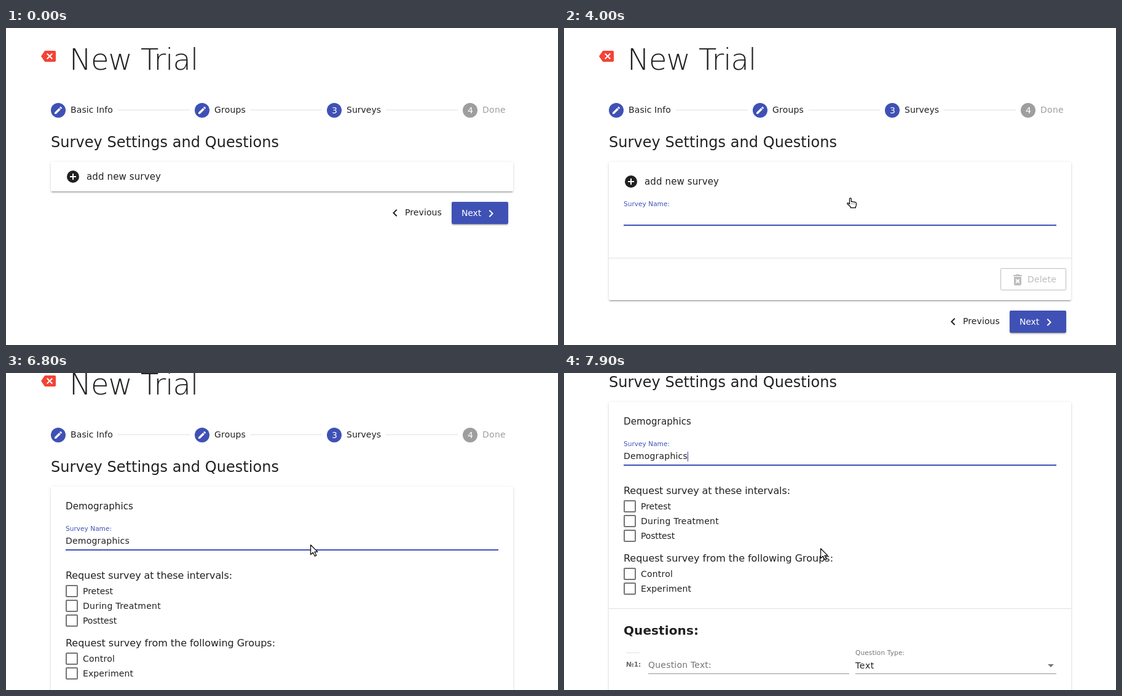
An HTML page that plays this animation: 898x516 px, repeating every 8000 ms.

```html
<!DOCTYPE html>
<html lang="en">
<head>
<meta charset="utf-8">
<title>New Trial</title>
<style>
@property --open { syntax: '<number>'; inherits: true; initial-value: 0; }
@property --float { syntax: '<number>'; inherits: true; initial-value: 0; }
@property --n { syntax: '<integer>'; inherits: true; initial-value: 0; }
@property --caret { syntax: '<integer>'; inherits: true; initial-value: 1; }
@property --scroll { syntax: '<number>'; inherits: true; initial-value: 0; }
@property --kind { syntax: '<integer>'; inherits: true; initial-value: 0; }

html, body { margin: 0; width: 100%; height: 100%; overflow: hidden; background: #fff; }
.stage {
  --ink: #212121; --blue: #3f51b5; --hint: #757575; --rule: #e0e0e0;
  position: absolute; inset: 0; overflow: hidden; background: #fff;
  color: var(--ink); font-family: "DejaVu Sans", sans-serif;
  animation-name: open, float, type, blink, scroll;
  animation-duration: 8s; animation-delay: -20ms;
  animation-timing-function: step-end; animation-iteration-count: infinite;
}
.stage div, .stage p, .stage svg { position: absolute; margin: 0; left: 0; top: 0; overflow: visible; }
.page { transform: translateY(calc(var(--scroll) * -1px)); }

/* --x is the left edge, --y the baseline, --b the baseline inside the line box */
.t { --b: 15px; white-space: pre; font-size: 14px; line-height: 20px; }
.stage .t { left: calc(var(--x) * 1px); top: calc(var(--y) * 1px - var(--b)); }
.s15 { font-size: 15px; }
.s16 { font-size: 16px; }
.s20 { --b: 17px; font-size: 20px; font-weight: 700; }
.s24 { --b: 18px; font-size: 24px; }
.num { --b: 13px; font-size: 10.5px; font-weight: 700; color: #666; }
.hint { color: var(--hint); }
.white { color: #fff; }
.off { color: #9e9e9e; }
.faint { color: #bdbdbd; }
.small { transform: scale(.75); transform-origin: 0 15px; }
.title { --b: 45px; font-size: 48px; line-height: 56px; font-weight: 200; letter-spacing: -.02em; }
.title.thin { font-size: 49px; -webkit-text-stroke: 2.1px #fff; }

.stage .panel, .stage .next {
  box-shadow: 0 3px 1px -2px rgba(0,0,0,.2), 0 2px 2px rgba(0,0,0,.14), 0 1px 5px rgba(0,0,0,.12);
  border-radius: 2px;
}
.stage .panel {
  left: 73px; top: 218px; width: 752px; overflow: hidden; background: #fff;
  height: calc(48px + 177px * var(--open) + 400px * min(var(--n), 1));
}
.stage .inner { left: -73px; top: -218px; }
.head { transform: translateY(calc(8px * var(--open))); }
.body { transform: translateY(calc(16px * (var(--open) - 1))); }
.blank { opacity: calc(1 - var(--n)); }
.form { opacity: var(--n); }
.arrow { transform: translate(797px, calc(245px + 2px * var(--open))) rotate(calc(180deg * var(--open))); }
.label {
  transform-origin: 0 0;
  transform: translateY(calc(-17.25px * var(--float))) scale(calc(1 - .25 * var(--float)));
  color: rgb(calc(117 - 54 * var(--float)), calc(117 - 36 * var(--float)), calc(117 + 64 * var(--float)));
}
.stage .line { left: 97px; top: 320px; width: 704px; height: 1px; background: #949494; }
.stage .focus {
  height: 2px; background: var(--blue); opacity: calc(var(--float) * 3);
  transform: scaleX(calc(.5 + .5 * var(--float)));
}
.typed span { position: relative; opacity: calc(var(--n) - var(--i)); }
.input span::after {
  content: ""; position: absolute; left: 100%; top: 1px; width: 1px; height: 16px; background: #303f9f;
  opacity: calc(min(var(--n) - var(--i), var(--i) + 2 - var(--n)) * var(--caret));
}
.nav { transform: translateY(calc(177px * var(--open) + 400px * min(var(--n), 1))); }
.stage .next { left: 725px; top: 283px; width: 92px; height: 36px; background: var(--blue); }

.cursor { transform: translate(-60px, 0); animation: move 8s -20ms step-end infinite; }
.cursor svg { fill: #fff; stroke: #000; stroke-linejoin: round; }
.point { opacity: calc(1 - var(--kind)); }
.hand { opacity: min(var(--kind), 2 - var(--kind)); }
.beam { opacity: calc(var(--kind) - 1); }

@keyframes open {
  23.75% { --open: .08; } 25% { --open: .58; } 26.25% { --open: .93; } 27.5% { --open: 1; }
}
@keyframes float {
  43.75% { --float: .12; } 45% { --float: .6; } 46.25% { --float: .92; } 47.5% { --float: 1; }
}
@keyframes type {
  58.75% { --n: 2; } 60% { --n: 3; } 61.25% { --n: 4; } 63.75% { --n: 5; }
  65% { --n: 6; } 66.25% { --n: 7; } 67.5% { --n: 8; } 68.75% { --n: 9; }
  70% { --n: 10; } 71.25% { --n: 11; } 72.5% { --n: 12; }
}
@keyframes blink { 75% { --caret: 0; } 90% { --caret: 1; } }
@keyframes scroll {
  82.5% { --scroll: 7; } 83.75% { --scroll: 19; } 85% { --scroll: 33; } 86.25% { --scroll: 46; }
  87.5% { --scroll: 60; } 88.75% { --scroll: 75; } 90% { --scroll: 93; } 91.25% { --scroll: 111; }
  92.5% { --scroll: 128; } 93.75% { --scroll: 145; } 95% { --scroll: 156; } 96.25% { --scroll: 163; }
  97.5% { --scroll: 168; } 98.75% { --scroll: 171; }
}
/* --kind: 0 pointer, 1 hand, 2 text beam */
@keyframes move {
  10% { transform: translate(39px, 251px); --kind: 0; }
  11.25% { transform: translate(58px, 248px); --kind: 0; }
  12.5% { transform: translate(86px, 242px); --kind: 1; }
  13.75% { transform: translate(114px, 236px); --kind: 1; }
  15% { transform: translate(136px, 236px); --kind: 1; }
  16.25% { transform: translate(146px, 241px); --kind: 1; }
  32.5% { transform: translate(170px, 262px); --kind: 1; }
  33.75% { transform: translate(181px, 277px); --kind: 1; }
  35% { transform: translate(191px, 292px); --kind: 2; }
  36.25% { transform: translate(193px, 297px); --kind: 2; }
  41.25% { transform: translate(189px, 288px); --kind: 2; }
  43.75% { transform: translate(196px, 292px); --kind: 2; }
  45% { transform: translate(235px, 306px); --kind: 2; }
  46.25% { transform: translate(305px, 313px); --kind: 2; }
  47.5% { transform: translate(380px, 306px); --kind: 2; }
  48.75% { transform: translate(435px, 291px); --kind: 2; }
  50% { transform: translate(460px, 276px); --kind: 1; }
  52.5% { transform: translate(487px, 276px); --kind: 1; }
  83.75% { transform: translate(495px, 278px); --kind: 0; }
  85% { transform: translate(495px, 279px); --kind: 0; }
  86.25% { transform: translate(492px, 285px); --kind: 0; }
  87.5% { transform: translate(489px, 290px); --kind: 0; }
  88.75% { transform: translate(486px, 295px); --kind: 0; }
  90% { transform: translate(485px, 298px); --kind: 0; }
  91.25% { transform: translate(484px, 300px); --kind: 0; }
  92.5% { transform: translate(483px, 302px); --kind: 0; }
  93.75% { transform: translate(482px, 303px); --kind: 0; }
  95% { transform: translate(476px, 301px); --kind: 0; }
  96.25% { transform: translate(460px, 297px); --kind: 0; }
  97.5% { transform: translate(439px, 291px); --kind: 0; }
  98.75% { transform: translate(417px, 285px); --kind: 0; }
}
</style>
</head>
<body>
<div class="stage">
  <div class="page">
    <svg width="1" height="1">
      <defs>
        <g id="pencil">
          <circle r="12" fill="#3f51b5"/>
          <path transform="translate(-8 -8) scale(.6667)" fill="#fff" d="M3 17.25V21h3.75L17.81 9.94l-3.75-3.75L3 17.25zM20.71 7.04c.39-.39.39-1.02 0-1.41l-2.34-2.34c-.39-.39-1.02-.39-1.41 0l-1.83 1.83 3.75 3.75 1.83-1.83z"/>
        </g>
        <rect id="check" x="98" width="18" height="18" rx="1" fill="none" stroke="#757575" stroke-width="2"/>
      </defs>
      <path transform="translate(57 34)" fill="#f44336" d="M22 3H7c-.69 0-1.23.35-1.59.88L0 12l5.41 8.11c.36.53.9.89 1.59.89h15c1.1 0 2-.9 2-2V5c0-1.1-.9-2-2-2zm-3 12.59L17.59 17 14 13.41 10.41 17 9 15.59 12.59 12 9 8.41 10.41 7 14 10.59 17.59 7 19 8.41 15.41 12 19 15.59z"/>
      <use href="#pencil" x="85" y="134"/>
      <use href="#pencil" x="319" y="134"/>
      <circle cx="534" cy="134" r="12" fill="#3f51b5"/>
      <circle cx="755" cy="134" r="12" fill="#9e9e9e"/>
      <path stroke="#e0e0e0" d="M182 133.5H299M398 133.5H514M618 133.5H735"/>
    </svg>
    <p class="t title" style="--x:103;--y:68">New Trial</p>
    <p class="t" style="--x:105;--y:138">Basic Info</p>
    <p class="t" style="--x:339;--y:138">Groups</p>
    <p class="t white" style="--x:530;--y:139">3</p>
    <p class="t" style="--x:554;--y:138">Surveys</p>
    <p class="t white" style="--x:751;--y:139">4</p>
    <p class="t off" style="--x:775;--y:138">Done</p>
    <p class="t s24" style="--x:73;--y:194">Survey Settings and Questions</p>

    <div class="panel"><div class="inner">
      <div class="head">
        <div class="blank">
          <svg width="1" height="1">
            <circle cx="109" cy="242" r="10" fill="#212121"/>
            <path stroke="#fff" stroke-width="2" d="M104 242h10M109 237v10"/>
          </svg>
          <p class="t s15" style="--x:131;--y:247">add new survey</p>
        </div>
        <p class="t s15 typed" style="--x:97;--y:247">Demographics</p>
      </div>
      <svg class="arrow" width="0" height="0" style="transform-origin:0 0">
        <path fill="none" stroke="#757575" stroke-width="2" d="M-5-2.5L0 2.5L5-2.5"/>
      </svg>

      <div class="body">
        <p class="t label" style="--x:97;--y:311">Survey Name:</p>
        <p class="t typed input" style="--x:97;--y:311">Demographics</p>
        <div class="line"></div>
        <div class="line focus"></div>

        <div class="blank">
          <svg width="1" height="1">
            <path stroke="#e0e0e0" d="M73 374.5H825"/>
            <rect x="710.5" y="391.5" width="106" height="35" rx="1" fill="none" stroke="#bdbdbd"/>
            <path transform="translate(726 398)" fill="#bdbdbd" d="M6 19c0 1.1.9 2 2 2h8c1.1 0 2-.9 2-2V7H6v12zm2.46-7.12l1.41-1.41L12 12.59l2.12-2.12 1.41 1.41L13.41 14l2.12 2.12-1.41 1.41L12 15.41l-2.12 2.12-1.41-1.41L10.59 14l-2.13-2.12zM15.5 4l-1-1h-5l-1 1H5v2h14V4z"/>
          </svg>
          <p class="t faint" style="--x:754;--y:414">Delete</p>
        </div>

        <div class="form">
          <svg width="1" height="1">
            <use href="#check" y="379"/>
            <use href="#check" y="403"/>
            <use href="#check" y="427"/>
            <use href="#check" y="489"/>
            <use href="#check" y="513"/>
            <path stroke="#e0e0e0" d="M73 554.5H825M101 626.5H123"/>
            <path stroke="#949494" d="M137 660.5H464M474 660.5H801"/>
            <path fill="#757575" d="M787 645h10l-5 5z"/>
          </svg>
          <p class="t s16" style="--x:97;--y:368">Request survey at these intervals:</p>
          <p class="t" style="--x:125;--y:393">Pretest</p>
          <p class="t" style="--x:125;--y:417">During Treatment</p>
          <p class="t" style="--x:125;--y:441">Posttest</p>
          <p class="t s16" style="--x:97;--y:478">Request survey from the following Groups:</p>
          <p class="t" style="--x:125;--y:503">Control</p>
          <p class="t" style="--x:125;--y:527">Experiment</p>
          <p class="t s20" style="--x:97;--y:597">Questions:</p>
          <p class="t num" style="--x:101;--y:648">№1:</p>
          <p class="t hint" style="--x:137;--y:651">Question Text:</p>
          <p class="t hint small" style="--x:474;--y:630">Question Type:</p>
          <p class="t" style="--x:474;--y:652">Text</p>
        </div>
      </div>
    </div></div>

    <div class="nav">
      <div class="next"></div>
      <svg width="1" height="1">
        <path transform="translate(621 289)" fill="#212121" d="M15.41 7.41L14 6l-6 6 6 6 1.41-1.41L10.83 12z"/>
        <path transform="translate(777 290)" fill="#fff" d="M10 6L8.59 7.41 13.17 12l-4.58 4.59L10 18l6-6z"/>
      </svg>
      <p class="t" style="--x:649;--y:305">Previous</p>
      <p class="t white" style="--x:741;--y:306">Next</p>
    </div>
  </div>

  <div class="cursor">
    <svg class="point" width="13" height="20"><path stroke-width="1.2" d="M.6.8V16.6l3.7-3.5 3 6 2.6-1.2-2.9-5.8h5z"/></svg>
    <svg class="hand" width="17" height="18">
      <path stroke-width="1.2" d="M4.5 10.5V2.3a1.4 1.4 0 0 1 2.8 0V6.8q1.4-1 2.6.3 1.4-.8 2.6.4 2.6-.6 2.9 1.8v3.2q0 1.5-1 2.4v1.8H6.3v-1.5L1 10.3q-.6-1.8 1.2-1.7z"/>
      <path d="M7.5 9.5v1M10 9.5v1M12.5 9.5v1"/>
    </svg>
    <svg class="beam" width="9" height="17"><path fill="none" d="M1 .5h2.5l1 1 1-1H8M4.5 1.5v14M1 16.5h2.5l1-1 1 1H8"/></svg>
  </div>
</div>
<script>
const ctx = document.createElement('canvas').getContext('2d');
const all = sel => document.querySelectorAll(sel);

all('.typed').forEach(el => {
  el.innerHTML = [...el.textContent].map((c, i) => `<span style="--i:${i}">${c}</span>`).join('');
});

// Space text as if every glyph advanced by whole pixels.
all('.t:not(.title):not(.num)').forEach(el => {
  const css = getComputedStyle(el), chars = [...el.textContent];
  ctx.font = `${css.fontWeight} ${css.fontSize} ${css.fontFamily}`;
  const whole = chars.reduce((sum, c) => sum + Math.round(ctx.measureText(c).width), 0);
  el.style.letterSpacing = (whole - parseFloat(css.width)) / chars.length + 'px';
});

// Without an extra-light face, slim the regular one.
const stem = weight => {
  ctx.font = `${weight} 200px "DejaVu Sans", sans-serif`;
  const m = ctx.measureText('l');
  return m.actualBoundingBoxRight + m.actualBoundingBoxLeft;
};
if (stem(200) > stem(400) * .8) all('.title')[0].classList.add('thin');
</script>
</body>
</html>
```
